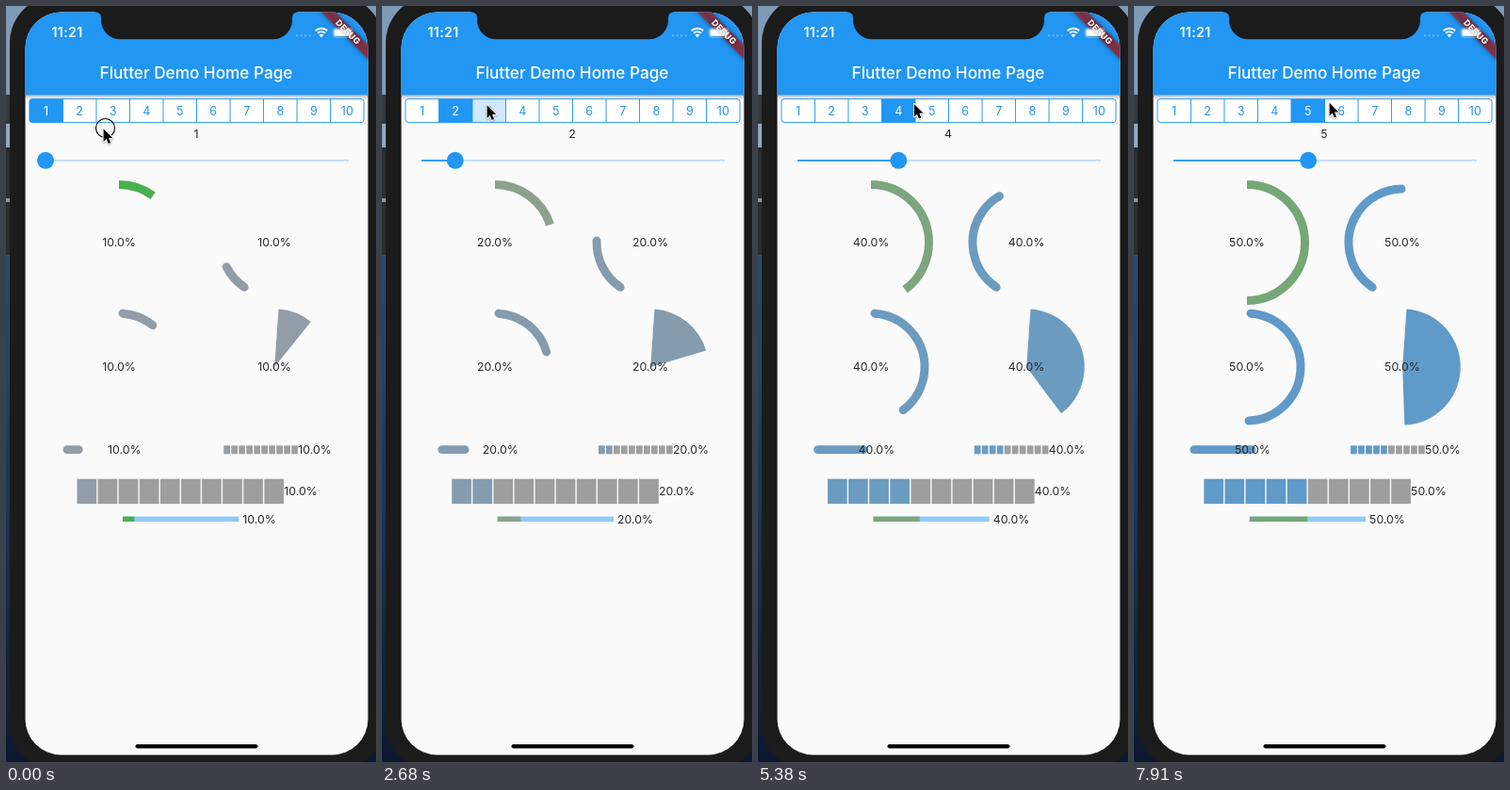
An HTML page with a canvas that plays this animation: 393 by 802 pixels, repeating every 8000 ms.

```html
<!DOCTYPE html>
<html lang="en">
<head>
<meta charset="utf-8">
<title>Progress indicators</title>
<style>
html, body { margin: 0; width: 100%; height: 100%; overflow: hidden; background: #1b1b1b; }
canvas { display: block; width: 393px; height: 802px; }
</style>
</head>
<body>
<canvas id="stage"></canvas>
<script>
const W = 393, H = 802, LOOP = 8000, FRAME = 149.2;
const BLUE = '#2196f3', GREY = '#9e9e9e', PAGE = '#fafafa', BEZEL = '#1b1b1b', INK = '#282828';
const canvas = document.getElementById('stage');
const ctx = canvas.getContext('2d');
const dpr = window.devicePixelRatio || 1;
canvas.width = W * dpr;
canvas.height = H * dpr;

// Each tap selects the next segment
const TAPS = [{ down: 450, up: 890 }, { down: 2150, up: 2720 }, { down: 4500, up: 4700 }, { down: 6500, up: 6750 }];

const HOME = { x: 103, y: 129 };
const MOVES = [
  { from: 0, to: 440, x: 84.5, y: 106.5 },
  { from: 1200, to: 1490, x: 111, y: 104 },
  { from: 3140, to: 3730, x: 141, y: 104 },
  { from: 5230, to: 5370, x: 165, y: 102.5 },
  { from: 5370, to: 5660, x: 186, y: 117 },
  { from: 5670, to: 6110, x: 181, y: 105 },
  { from: 7465, to: 7900, x: 207, y: 101.5 }
];

const clamp = k => Math.min(1, Math.max(0, k));
const lerp = (a, b, k) => a + (b - a) * k;
const easeOut = k => 1 - (1 - k) ** 3;
const rad = deg => deg * Math.PI / 180;
const mix = (a, b, k) => `rgb(${a.map((c, i) => Math.round(lerp(c, b[i], k))).join()})`;

function pointerAt(t) {
  return MOVES.reduce((p, m) => {
    const k = easeOut(clamp((t - m.from) / (m.to - m.from)));
    return { x: lerp(p.x, m.x, k), y: lerp(p.y, m.y, k) };
  }, HOME);
}

function controlAt(t) {
  const value = 1 + TAPS.filter(tap => t >= tap.up).length;
  return {
    value,
    ring: t < 100 || TAPS.some(tap => t >= tap.down && t < tap.up - 50),
    press: n => n > 1 && n <= 5 ? clamp((t - TAPS[n - 2].down) / 140) : 0,
    // 0 before a segment is chosen, 1 once its fill has faded in
    fade: n => n === 1 ? 1 : n <= 5 ? clamp((t - TAPS[n - 2].up) / 150) : 0
  };
}

function rect(x, y, w, h, fill) {
  ctx.fillStyle = fill;
  ctx.fillRect(x, y, w, h);
}

function roundPath(x, y, w, h, r) {
  ctx.beginPath();
  ctx.roundRect(x, y, w, h, r);
}

function fillRound(x, y, w, h, r, fill) {
  roundPath(x, y, w, h, r);
  ctx.fillStyle = fill;
  ctx.fill();
}

function disc(x, y, r, fill) {
  ctx.beginPath();
  ctx.arc(x, y, r, 0, 7);
  ctx.fillStyle = fill;
  ctx.fill();
}

function sector(x, y, r, from, sweep, fill) {
  ctx.beginPath();
  ctx.moveTo(x, y);
  ctx.arc(x, y, r, rad(from), rad(from + sweep));
  ctx.fillStyle = fill;
  ctx.fill();
}

function stroke(color, width, cap = 'butt') {
  ctx.strokeStyle = color;
  ctx.lineWidth = width;
  ctx.lineCap = cap;
  ctx.stroke();
}

function line(x1, y1, x2, y2, color, width, cap) {
  ctx.beginPath();
  ctx.moveTo(x1, y1);
  ctx.lineTo(x2, y2);
  stroke(color, width, cap);
}

function arc(x, y, r, from, sweep, color, width, cap) {
  ctx.beginPath();
  ctx.arc(x, y, r, rad(from), rad(from + sweep));
  stroke(color, width, cap);
}

function setFont(size, weight = 400, spacing = 0) {
  ctx.font = `${weight} ${size}px Inter, Roboto, sans-serif`;
  ctx.letterSpacing = spacing + 'px';
}

// y is the middle of the capitals
function text(str, x, y, size, color, align = 'center', weight, spacing) {
  setFont(size, weight, spacing);
  ctx.textAlign = align;
  ctx.textBaseline = 'alphabetic';
  ctx.fillStyle = color;
  ctx.fillText(str, x, y + size * 0.364);
}

function drawDesktop() {
  const sea = ctx.createLinearGradient(0, 264, 0, H);
  sea.addColorStop(0, '#2a4a6e');
  sea.addColorStop(0.35, '#1c3c66');
  sea.addColorStop(1, '#0d1830');
  rect(0, 0, W, H, sea);
  rect(0, 0, W, 94, '#7f9ab5');
  rect(0, 94, 10, 31, '#34393f');
  rect(0, 125, 10, 25, '#8fa9c2');
  rect(0, 150, 10, 54, '#2b2d30');
  rect(0, 204, 10, 4, '#8a97a3');
  rect(0, 208, 10, 56, '#2c2c2d');
}

function drawNotch() {
  ctx.beginPath();
  ctx.moveTo(95, 5);
  ctx.lineTo(95, 6.5);
  ctx.quadraticCurveTo(101, 6.5, 101, 13);
  ctx.arcTo(101, 35.2, 123, 35.2, 20);
  ctx.arcTo(304, 35.2, 304, 13, 20);
  ctx.lineTo(304, 13);
  ctx.quadraticCurveTo(304, 6.5, 310, 6.5);
  ctx.lineTo(310, 5);
  ctx.fillStyle = BEZEL;
  ctx.fill();
}

function drawStatus() {
  text('11:21', 65, 28.2, 14.2, '#fff', 'center', 600, 0.3);
  for (let i = 0; i < 4; i++) disc(309 + i * 4.6, 31.5, 1.3, 'rgba(255,255,255,.3)');
  arc(335, 33, 9.2, -133, 86, '#fff', 2.1);
  arc(335, 33, 5.8, -133, 86, '#fff', 2);
  sector(335, 33.5, 3.6, -133, 86, '#fff');
}

function atCorner(paint) {
  ctx.save();
  ctx.translate(384.5, 6.5);
  ctx.rotate(Math.PI / 4);
  paint();
  ctx.restore();
}

function drawBanner() {
  atCorner(() => {
    ctx.shadowColor = 'rgba(0,0,0,.75)';
    ctx.shadowBlur = 5;
    rect(-36, 24.6, 72, 10.5, 'rgba(183,28,28,.63)');
  });
  roundPath(347.3, 23.3, 21, 10, 3);
  stroke('rgba(255,255,255,.45)', 1);
  fillRound(348.5, 24.5, 18.6, 7.6, 1.8, '#fff');
  atCorner(() => {
    ctx.shadowColor = 'rgba(0,0,0,.5)';
    ctx.shadowBlur = 4;
    text('DEBUG', 0, 29.9, 9, '#fff', 'center', 800, 0.3);
  });
}

function drawAppBar() {
  const shade = ctx.createLinearGradient(0, 94, 0, 99);
  shade.addColorStop(0, 'rgba(0,0,0,.28)');
  shade.addColorStop(1, 'rgba(0,0,0,0)');
  rect(20, 94, 366, 5, shade);
  rect(20, 5, 366, 89.4, BLUE);
  text('Flutter Demo Home Page', 202, 70.3, 17.2, '#fff', 'center', 500);
}

function drawSegments({ press, fade }) {
  const x0 = 24.9, y0 = 98.6, w = 35.52, h = 25;
  ctx.save();
  roundPath(x0, y0, w * 10, h, 3);
  ctx.clip();
  rect(x0, y0, w * 10, h, '#fff');
  for (let n = 1; n <= 10; n++) {
    const x = x0 + (n - 1) * w;
    const left = fade(n + 1);
    const on = fade(n) * (1 - left);
    const tint = left ? on : lerp(0.22 * press(n), 1, on);
    rect(x, y0, w, h, `rgba(33,150,243,${tint})`);
    text(String(n), x + w / 2, 111, 12.6, mix([33, 150, 243], [255, 255, 255], on));
  }
  for (let n = 1; n < 10; n++) line(x0 + n * w, y0, x0 + n * w, y0 + h, BLUE, 0.95);
  ctx.restore();
  roundPath(x0, y0, w * 10, h, 3);
  stroke(BLUE, 0.95);
}

function drawSlider(v) {
  const x = 42 + (v - 1) / 9 * 322;
  line(42, 163.8, 364, 163.8, '#bcdffb', 1.8);
  line(42, 163.8, x, 163.8, BLUE, 1.8);
  disc(x, 163.8, 9, BLUE);
}

function drawBlocks(x, y, pitch, w, h, v, color) {
  for (let i = 0; i < 10; i++) rect(x + i * pitch, y, w, h, i < v ? color : GREY);
}

function drawIndicators(v) {
  const grey = [158, 158, 158];
  const blue = mix(grey, [33, 150, 243], v / 10);
  const green = v === 1 ? '#4caf50' : mix(grey, [76, 175, 80], v / 10);
  const label = v * 10 + '.0%';
  const put = (x, y, align) => text(label, x, y, 12.3, INK, align);

  // Rows are centred, so a narrower label moves them right
  setFont(12.3);
  const dx = (ctx.measureText('40.0%').width - ctx.measureText(label).width) / 2;

  arc(120, 251, 61.5, -90, 36 * v, green, 9);
  arc(285, 251, 57, 124, 29 * v, blue, 9, 'round');
  arc(120, 383, 57, -86, 34.8 * v, blue, 9, 'round');
  sector(285.2, 383, 61.6, -86, 34.8 * v, blue);
  for (const x of [120, 285]) {
    put(x, 251);
    put(x, 383);
  }

  line(63.5 + dx, 470.7, 63.5 + dx + 12.2 * v, 470.7, blue, 8.8, 'round');
  put(106.6 + dx, 471, 'left');

  drawBlocks(229.8 + dx, 466.3, 8, 6.7, 9, v, blue);
  put(308.8 + dx, 471, 'left');

  drawBlocks(74 + dx, 501.7, 22.1, 20.7, 26.4, v, blue);
  put(293.8 + dx, 515, 'left');

  rect(122.5 + dx, 541.6, 123.2, 5.4, '#90caf9');
  rect(122.5 + dx, 541.6, 12.32 * v, 5.4, green);
  put(249.8 + dx, 544.5, 'left');
}

function drawPointer({ x, y }, ring) {
  if (ring) {
    ctx.beginPath();
    ctx.arc(x + 2.5, y + 0.5, 10, 0, 7);
    stroke('#000', 1.1);
  }
  ctx.save();
  ctx.translate(x + 0.6, y + 1.3);
  ctx.beginPath();
  for (const [px, py] of [[0, 0], [0, 13.6], [3.1, 10.7], [5.2, 15.6], [7.5, 14.6], [5.4, 9.8], [9.6, 9.6]]) ctx.lineTo(px, py);
  ctx.closePath();
  ctx.lineJoin = 'round';
  ctx.shadowColor = 'rgba(0,0,0,.3)';
  ctx.shadowBlur = 2;
  ctx.shadowOffsetY = 1;
  stroke('#fff', 2);
  ctx.shadowColor = 'transparent';
  ctx.fillStyle = '#000';
  ctx.fill();
  ctx.restore();
}

function draw(t) {
  const control = controlAt(t);
  const { value } = control;
  ctx.setTransform(dpr, 0, 0, dpr, 0, 0);
  drawDesktop();
  fillRound(4, -11, 397, 822, 50, BEZEL);

  ctx.save();
  roundPath(20.5, 6.5, 364, 788, 38);
  ctx.clip();
  rect(20, 6, 366, 790, PAGE);
  drawAppBar();
  drawSegments(control);
  text(String(value), 202, 135.3, 12.3, INK);
  drawSlider(value);
  drawIndicators(value);
  drawStatus();
  drawBanner();
  fillRound(137.5, 783.2, 130, 4.3, 2.15, '#000');
  ctx.restore();

  drawNotch();
  drawPointer(pointerAt(t), control.ring);
}

function tick() {
  const t = performance.now() % LOOP;
  draw(Math.floor((t + 18) / FRAME) * FRAME);
  requestAnimationFrame(tick);
}
tick();
</script>
</body>
</html>
```
